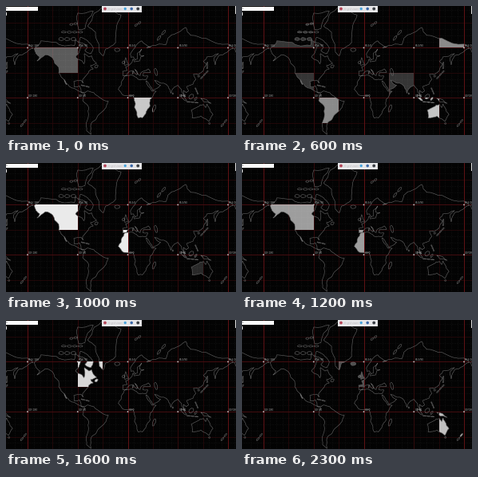
Write a matplotlib script that moves like this. It is 288x162 px and loops after 2400 ms.

```python
import numpy as np
import matplotlib.pyplot as plt
from matplotlib.animation import FuncAnimation
from matplotlib.patches import Circle, PathPatch, Rectangle
from matplotlib.path import Path

W, H, DPI = 288, 162, 72
FRAMES, STEP = 24, 100
FADE = 6.5                  # steps until a flash is gone
WORLD = 251.0               # width of the whole world in pixels
CELL = WORLD / 8
X0, Y0 = 152.5, 115.2       # where lon 0 / lat 0 falls
LEFT, TOP = X0 - WORLD / 2, Y0 - WORLD / 2

rng = np.random.default_rng(4)

# Main capes and bays as (lon, lat); the detail between them is generated
AMERICA = [
    (-168, 66), (-156, 71), (-128, 70), (-108, 68), (-96, 68), (-94, 71.5),
    (-82, 68), (-87, 64), (-94, 59), (-82, 55), (-79, 52), (-77, 57),
    (-78, 62), (-70, 59), (-65, 60), (-56, 52.5), (-67, 50), (-62, 46),
    (-70, 43), (-76, 36), (-81, 31), (-80.5, 25.5), (-84, 30), (-97, 28),
    (-96, 19), (-91, 19), (-87, 21), (-84, 15), (-83, 10), (-77, 9),
    (-72, 12), (-61, 9), (-50, 0), (-35, -6), (-39, -17), (-48, -26),
    (-57, -36), (-65, -41), (-66, -55), (-74, -51), (-73, -38), (-70, -18),
    (-81, -5), (-77, 7), (-83, 9), (-95, 16), (-105, 20), (-114, 31),
    (-110, 23), (-117, 33), (-124, 41), (-124, 48), (-135, 58), (-148, 61),
    (-163, 55), (-158, 59), (-165, 62)]
ASIA = [
    (25, 71), (41, 67), (34, 66.5), (44, 68), (68, 68.5), (72, 72.5),
    (87, 75), (104, 77.5), (113, 74), (140, 72.5), (180, 69), (190, 66),
    (178, 63), (163, 60), (157, 51), (155, 58), (163, 62), (142, 59),
    (136, 54.5), (141, 52), (135, 43), (128, 40), (129, 35.5), (126, 35),
    (125, 39.5), (118, 39), (122, 31), (117, 23.5), (106, 20), (109, 12),
    (105, 9), (100, 13), (103.5, 1.5), (98, 9), (94, 17), (90, 22), (80, 15),
    (77.5, 8), (72.5, 20), (66, 25), (56, 27), (48, 30), (52, 25), (59, 22),
    (45, 13), (35, 28)]
AFRICA = [
    (33, 29), (43, 12), (51, 11.5), (40, -3), (40, -15), (35, -21), (32, -28),
    (26, -34), (18.5, -34), (12, -17), (13, -8), (9, 4), (-8, 4.5), (-17, 15),
    (-10, 30), (-6, 36), (10, 37), (20, 31), (33, 31)]
EUROPE = [
    (36, 36.5), (27, 37), (28, 41), (41, 41.5), (37, 46), (28, 43), (23, 40),
    (22, 37), (13, 45.5), (18, 40), (16, 38), (9, 44), (3, 43), (-2, 37),
    (-9, 37), (-9, 43), (-1, 44), (-4, 48.5), (8, 54), (10, 57), (12, 54),
    (21, 55), (23, 59), (29, 60), (21, 61), (25, 65.5), (17, 62), (17, 57),
    (13, 56), (10, 59), (6, 58.5), (5, 62), (14, 67.5)]
GREENLAND = [(-72, 78), (-58, 75.5), (-52, 69), (-51, 63), (-44, 60),
             (-40, 65.5), (-22, 70), (-20, 78), (-12, 81.5), (-33, 83.5),
             (-60, 82)]
AUSTRALIA = [(114, -22), (115.5, -34), (124, -33.5), (131, -31.5), (138, -35),
             (146, -39), (153, -29), (146, -18), (142.5, -11), (140, -17.5),
             (136, -12), (130, -13), (122, -18)]
GUINEA = [(131, -1), (141, -3), (150, -10), (138, -8), (134, -4)]
BAFFIN = [(-85, 73), (-72, 71), (-62, 66.5), (-66, 62), (-77, 64.5),
          (-73, 67), (-88, 70.5)]
ELLESMERE = [(-88, 76.5), (-77, 77), (-62, 82.5), (-90, 82)]
BRITAIN = [(-5, 50), (1.5, 51.5), (-4, 58.5), (-5, 54)]

# Island rows: from, to, how many, breadth relative to length
ISLES = [
    ((-125, 72), (-92, 72), 3, .6), ((-120, 75.5), (-80, 75.5), 4, .4),
    ((-105, 78.5), (-90, 79), 2, .5), ((-24, 65), (-14, 65), 1, .6),
    ((-9, 52), (-6.5, 55), 1, .7), ((12, 78), (24, 79.5), 2, .5),
    ((52, 71), (68, 76.5), 2, .3), ((8.8, 39), (9.3, 43), 2, .5),
    ((130.5, 32), (144.5, 44), 3, .35), ((142.5, 46), (143, 54), 1, .2),
    ((121, 18), (126, 6), 3, .4), ((95.5, 5.5), (105.5, -6), 1, .25),
    ((105.5, -7), (127, -9), 3, .2), ((110.5, -2), (117.5, 6), 1, .7),
    ((120, -5), (124, 1), 1, .4), ((45, -25), (49.5, -12.5), 1, .35),
    ((80.5, 9), (81, 6), 1, .6), ((-84.5, 22.5), (-68.5, 18.5), 2, .2),
    ((-59, 47.5), (-54, 50.5), 1, .7), ((167, -46.5), (178, -36), 2, .3),
    ((145, -42), (148, -42), 1, .8)]
CASPIAN = ((49, 46.5), (52, 37), 1, .4)

# Start step of each flash -> cells (column, row) lit by it
FLASHES = {
    -4.2: [(0, 2), (1, 2)], -1.4: [(4, 4)],
    .8: [(0, 1), (1, 1), (1, 3), (5, 3)], 3: [(7, 1), (2, 4)],
    4.5: [(6, 4)], 9.5: [(0, 2), (1, 2), (3, 3)], 15: [(2, 2)],
    18.5: [(3, 2)], 21.4: [(7, 4)]}


def project(points):
    lon, lat = np.radians(points).T
    r = WORLD / (2 * np.pi)
    return np.column_stack([X0 + r * lon,
                            Y0 - r * np.log(np.tan(np.pi / 4 + lat / 2))])


def ring(p, rounds=2, rough=.11):
    """Close a pixel outline, roughened by midpoint displacement."""
    for _ in range(rounds):
        d = np.roll(p, -1, axis=0) - p
        normal = np.column_stack([-d[:, 1], d[:, 0]])
        mid = p + d / 2 + normal * rng.uniform(-rough, rough, (len(p), 1))
        p = np.stack([p, mid], axis=1).reshape(-1, 2)
    return Path(np.vstack([p, p[:1]]), closed=True)


def isles(start, end, count, breadth):
    """A row of rough ovals between two places."""
    a, b = project([start, end])
    along = (b - a) / count
    across = np.array([-along[1], along[0]]) * breadth
    gap = 1 if count == 1 else .84
    t = np.linspace(0, 2 * np.pi, 9)[:-1, None]
    oval = gap / 2 * (np.cos(t) * along + np.sin(t) * across)
    return [ring(a + (k + .5) * along + oval, 1, .2) for k in range(count)]


fig = plt.figure(figsize=(W / DPI, H / DPI), dpi=DPI, facecolor="#030303")
ax = fig.add_axes([0, 0, 1, 1])
ax.set(xlim=(0, W), ylim=(H, 0))
ax.axis("off")


def grid(step, color, width, style="-", xs=True, ys=True):
    for k in range(-2, int(WORLD / step) + 6):
        if xs:
            ax.axvline(LEFT + k * step, color=color, lw=width, ls=style, zorder=1)
        if ys:
            ax.axhline(TOP + k * step, color=color, lw=width, ls=style, zorder=1)


def box(x, y, w, h, color):
    ax.add_patch(Rectangle((x, y), w, h, fc=color, lw=0, zorder=8))


def dot(x, y, r, color, z=9):
    ax.add_patch(Circle((x, y), r, fc=color, lw=0, zorder=z))


def label(x, y, text, size, color, z=9):
    ax.text(x, y, text, fontsize=size, color=color, va="center",
            family="DejaVu Sans", zorder=z)


grid(CELL / 4, "#171717", .6, (0, (1, 1.5)))
grid(CELL, "#260708", .8)
grid(2 * CELL, "#360a0c", .8, ys=False)
grid(4 * CELL, "#641216", .9, ys=False)
for row in (2, 4):
    ax.axhline(TOP + row * CELL, color="#480d10", lw=.9, zorder=1.1)

shapes = [ring(project(p)) for p in (
    AMERICA, ASIA + AFRICA + EUROPE, GREENLAND, AUSTRALIA, GUINEA, BAFFIN,
    ELLESMERE, BRITAIN)]
for row in ISLES:
    shapes += isles(*row)
land = Path.make_compound_path(*shapes)
lines = Path.make_compound_path(*shapes, *isles(*CASPIAN))
for dx in (-WORLD, 0, WORLD):
    moved = Path(lines.vertices + [dx, 0], lines.codes)
    ax.add_patch(PathPatch(moved, fc="none", ec="#6a6a6a", lw=.55, zorder=4))

for row, lat in ((2, "66.5"), (4, "0.0")):
    for col in range(0, 9, 2):
        x, y = LEFT + col * CELL, TOP + row * CELL
        dot(x, y, .9, "#c8c8c8", 5)
        label(x + 1.2, y - 2.2, f"{lat}/{col * 45 - 180}", 2.9, "#a8a8a8", 5)

# Search field, page edges and toolbar
box(0, .8, 40, 4.9, "white")
label(.3, 3.4, "ch", 2.6, "#777777")
box(0, 7.5, .8, 4.5, "#dddddd")
box(287.2, 0, .8, 10, "#dddddd")
box(119.5, 0, 50.5, 7.6, "#e6e6e8")
dot(124, 3.5, 1.9, "#b5475a")
label(127, 3.6, "tile grid viewer", 2.5, "#b4b0b6")
dot(149.2, 3.5, 1.7, "#4aa3dc")
dot(157.2, 3.5, 1.8, "#3c68a8")
dot(165.2, 3.5, 1.9, "#3a3e44")

fills = []
for start, cells in FLASHES.items():
    for col, row in cells:
        fill = PathPatch(land, fc="white", lw=0, alpha=0, zorder=3)
        ax.add_patch(fill)
        fill.set_clip_path(Rectangle((LEFT + col * CELL, TOP + row * CELL),
                                     CELL, CELL, transform=ax.transData))
        fills.append((fill, start))


def update(i):
    for fill, start in fills:
        age = (i - start) / FADE
        fill.set_alpha(1 - age if 0 <= age < 1 else 0)
    return [fill for fill, _ in fills]


anim = FuncAnimation(fig, update, frames=FRAMES, interval=STEP, repeat=True,
                     repeat_delay=0, blit=False)
plt.show()
```
